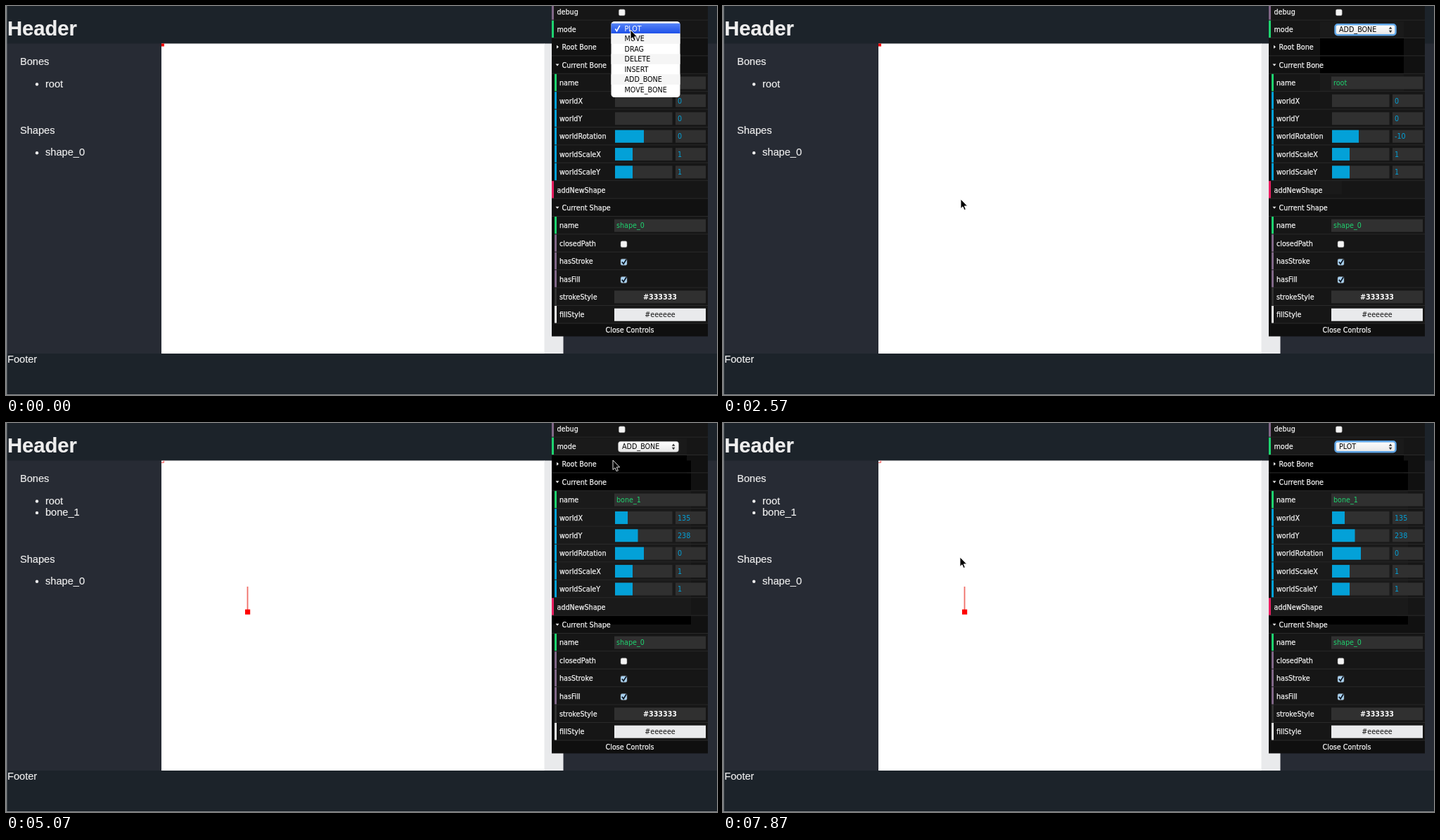
Animation of 1011 by 554 pixels, one loop 8000 ms. Source, as an HTML page:

```html
<!DOCTYPE html>
<html lang="en">
<head>
<meta charset="utf-8">
<title>Bone editor</title>
<style>
  html, body { margin: 0; width: 100%; height: 100%; overflow: hidden; background: #1c232a; }
  svg { display: block; }
  text { white-space: pre; font: 9.6px "DejaVu Sans", sans-serif; }
  .page { font: 14.6px "Liberation Sans", Arial, sans-serif; fill: #eee; stroke: #eee; stroke-width: .2px; }
  .page.big { font-size: 29.2px; font-weight: bold; }
  .label { fill: #f2f2f2; stroke: #f2f2f2; stroke-width: .25px; }
  .bold { font-weight: bold; }
  .mid { text-anchor: middle; }
</style>
</head>
<body>
<svg id="stage" width="1011" height="554" viewBox="0 0 1011 554">
  <defs>
    <linearGradient id="blue" x2="0" y2="1"><stop stop-color="#5684f7"/><stop offset="1" stop-color="#1c4fe8"/></linearGradient>
    <linearGradient id="button" x2="0" y2="1"><stop stop-color="#fff"/><stop offset="1" stop-color="#e6e6e6"/></linearGradient>
  </defs>
  <g id="scene"></g>
</svg>
<script>
const LOOP = 8000, PITCH = 25.4, ITEM = 14.53;
const GREEN = '#1ed36f', BLUE = '#03a1d8', PURPLE = '#806787', RED = '#e61d5f', FIELD = '#303030';
const MODES = ['PLOT', 'MOVE', 'DRAG', 'DELETE', 'INSERT', 'ADD_BONE', 'MOVE_BONE'];
const TITLES = [2, 3, 11];

// Pointer moves: first step, last step, number of steps, destination
const MOVES = [
  [320, 320, 1, 885, 37], [560, 930, 5, 880, 104], [1020, 1110, 2, 881, 105],
  [1300, 2040, 8, 339, 238], [2170, 2260, 2, 320, 262], [2350, 2570, 3, 338, 275],
  [2670, 2910, 3, 330, 268], [3450, 3620, 3, 340, 259], [3800, 4070, 4, 342, 267],
  [4290, 4290, 1, 339, 268], [4440, 4440, 1, 344, 265],
  [5070, 5070, 1, 863, 53], [5160, 5340, 3, 891, 35], [5430, 5870, 6, 890, 10],
  [5960, 6050, 2, 888, -30], [6850, 6940, 2, 866, 24], [7030, 7300, 4, 279, 268],
  [7400, 7580, 3, 338, 193], [7690, 7690, 1, 328, 183], [7780, 7870, 2, 337, 191]
];

const rect = (x, y, w, h, fill, more = '') =>
  `<rect x="${x}" y="${y}" width="${w}" height="${h}" fill="${fill}" ${more}/>`;
const path = (d, more) => `<path d="${d}" ${more}/>`;
const text = (x, y, s, cls = '', more = '') => `<text x="${x}" y="${y}" class="${cls}" ${more}>${s}</text>`;
const tinted = (x, y, s, fill) => text(x, y, s, '', `fill="${fill}"`);
const rowTop = i => -4.8 + PITCH * i;
const rowMid = i => 7.9 + PITCH * i;

function pointer(t) {
  let x = 888, y = 34;
  for (const [from, to, steps, tx, ty] of MOVES) {
    if (t < from) break;
    const gap = (to - from) / (steps - 1 || 1) || 1;
    const part = Math.min(steps, Math.floor((t - from) / gap + 1.01)) / steps;
    x += (tx - x) * part;
    y += (ty - y) * part;
  }
  return [x, y];
}

function page(bone) {
  const shift = bone ? 16.4 : 0;
  const item = (y, s) => `<circle cx="44" cy="${y - 4}" r="2.2" fill="#eee"/>` + text(56, y, s, 'page');
  let out = rect(0, 0, 1011, 554, '#1c232a') + rect(0, 53.5, 1011, 441.5, '#272b34')
    + rect(221, 53.5, 545, 441.5, '#fff') + rect(765.5, 53.5, 27, 441.5, '#e9eaec')
    + rect(0, 0, 1.4, 554, '#85888b') + rect(0, 553, 1011, 1, '#85888b')
    + text(2, 41.7, 'Header', 'page big') + text(2, 508, 'Footer', 'page')
    + text(20, 84.3, 'Bones', 'page') + item(115.5, 'root')
    + text(20, 182.3 + shift, 'Shapes', 'page') + item(213.3 + shift, 'shape_0');
  if (bone) {
    out += item(131.9, 'bone_1')
      + path('M221 56.5H224.5V53.5', 'fill="#fcc" stroke="#f66"')
      + rect(342.6, 233, 1.8, 34, '#ef6f68') + rect(340, 265.5, 7.2, 7.2, '#f00');
  } else out += rect(221, 53.5, 4, 4, '#f00');
  return out;
}

// Repaints the row backgrounds inside a box in deeper tones
function patch(x0, y0, x1, y1) {
  let out = '';
  for (let i = 0; i < 18; i++) {
    const top = Math.max(y0, rowTop(i)), end = Math.min(y1, rowTop(i + 1) - 1);
    if (end > top) out += rect(x0, top, x1 - x0, end - top, TITLES.includes(i) ? '#000' : '#1a1a1a');
  }
  return out;
}

function checkbox(x, y, on) {
  return rect(x - 4.5, y - 4.3, 9, 9, on ? '#a9d3f3' : '#f4f4f4', 'rx="2" stroke="#777" stroke-width=".5"')
    + (on ? path(`M${x - 2.6} ${y}l2.2 2.8l4 -6.4`, 'fill="none" stroke="#0a1420" stroke-width="1.7"') : '');
}

function select(mode, focus) {
  const ring = focus ? 'stroke="#5fa5e6" stroke-width="2.4"' : 'stroke="#999" stroke-width=".5"';
  return rect(870.5, 26.3, 86, 15, 'url(#button)', `rx="3.5" ${ring}`)
    + tinted(876, 37.2, mode, '#000')
    + path('M946.8 32.8h4.6l-2.3 -3.4zM946.8 34.8h4.6l-2.3 3.4z', 'fill="#333"');
}

function panel(t, bone, mode, focus) {
  let out = rect(776, 0, 222, 470.5, '#0f0f0f');
  for (let i = 0; i < 18; i++)
    out += rect(776, rowTop(i), 222, PITCH, TITLES.includes(i) ? '#111' : '#161616');
  if (t >= 1300) out += patch(849, 22, 968, 122) + patch(849, 249, 880, 268);
  if (t >= 3800) out += patch(776, 22, 968, 122) + patch(776, 249, 959, 284.5);
  if (bone) out += patch(776, 53.5, 974, 287);
  for (let i = 0; i < 18; i++) out += rect(776, rowTop(i + 1) - 1, 222, 1, '#2a2a2a');

  const label = (i, x, s, color) =>
    (color ? rect(x - (x < 785 ? 7.5 : 7), rowTop(i), 3, PITCH - 1, color) : '') + text(x, rowMid(i) + 3.7, s, 'label');
  const nested = (i, s, color) => rect(776, rowTop(i), 4, PITCH, '#0c0c0c') + label(i, 787, s, color);
  const title = (i, s, open) => label(i, 790.5, s)
    + path(`M${open ? 781.5 : 783} ${rowMid(i) - (open ? 1.5 : 3)}` + (open ? 'h5l-2.5 3z' : 'v5l3 -2.5z'), 'fill="#eee"');
  const box = (i, fill = FIELD) => rect(865, rowMid(i) - 9, 130, 18, fill);
  const name = (i, s) => nested(i, 'name', GREEN) + box(i) + tinted(868, rowMid(i) + 3.7, s, GREEN);
  const slider = (i, s, value, width) => nested(i, s, BLUE)
    + rect(866, rowMid(i) - 9, 81.5, 18, FIELD) + rect(866, rowMid(i) - 9, width, 18, BLUE)
    + rect(952, rowMid(i) - 9, 43, 18, FIELD) + tinted(955, rowMid(i) + 3.7, value, BLUE);
  const flag = (i, s, on) => nested(i, s, PURPLE) + checkbox(878.5, rowMid(i) + 1, on);
  const angle = bone || t < 90 ? 0 : -10;

  return out + label(0, 783.5, 'debug', PURPLE) + checkbox(875.8, 9, false)
    + label(1, 783.5, 'mode', GREEN) + select(mode, focus)
    + title(2, 'Root Bone', false) + title(3, 'Current Bone', true)
    + name(4, bone ? 'bone_1' : 'root')
    + slider(5, 'worldX', bone ? 135 : 0, bone ? 18 : 0)
    + slider(6, 'worldY', bone ? 238 : 0, bone ? 32.5 : 0)
    + slider(7, 'worldRotation', angle, 41 + angle * .3)
    + slider(8, 'worldScaleX', 1, 25) + slider(9, 'worldScaleY', 1, 25)
    + label(10, 783.5, 'addNewShape', RED) + title(11, 'Current Shape', true)
    + name(12, 'shape_0')
    + flag(13, 'closedPath', false) + flag(14, 'hasStroke', true) + flag(15, 'hasFill', true)
    + nested(16, 'strokeStyle', '#333') + box(16) + text(930, rowMid(16) + 3.7, '#333333', 'bold mid', 'fill="#fff"')
    + nested(17, 'fillStyle', '#eee') + box(17, '#e9eaec') + text(930, rowMid(17) + 3.7, '#eeeeee', 'mid', 'fill="#111"')
    + text(887, 465.2, 'Close Controls', 'label mid');
}

function menu(top, checked, cursorY) {
  const hot = Math.floor((cursorY - top) / ITEM);
  let out = rect(860.5, top - 2.7, 98, 108, '#fff', 'rx="4.5"');
  MODES.forEach((mode, i) => {
    const y = top + ITEM * i, ink = i === hot ? '#fff' : '#000';
    if (i === hot) out += rect(860.5, y, 98, ITEM, 'url(#blue)');
    else if (i % 2 && i < 6) out += rect(860.5, y, 98, ITEM, '#f5f5f5');
    out += tinted(879.5, y + 10.8, mode, ink);
    if (i === checked)
      out += path(`M866.3 ${y + 7.8}l2.2 3.2l4.3 -7.8`, `fill="none" stroke="${ink}" stroke-width="1.6"`);
  });
  return out;
}

function scene(t) {
  const bone = t >= 4150, [x, y] = pointer(t);
  const focus = t >= 1300 && t < 3800 || t >= 6850;
  const mode = t < 1300 || t >= 6850 ? 'PLOT' : 'ADD_BONE';
  let out = page(bone) + panel(t, bone, mode, focus);
  if (t < 1300) out += menu(24.7, 0, y);
  else if (t >= 5340 && t < 6850) out += menu(-48.2, 5, y);
  return out + path('M0 0V13.5L3 10.8L5.1 15.6L7.3 14.6L5.3 9.9H9.6Z',
    `transform="translate(${x} ${y})" fill="#000" stroke="#fff" stroke-width=".9"`);
}

const target = document.getElementById('scene');
let shown = '';
function draw(now) {
  const next = scene(now % LOOP);
  if (next !== shown) target.innerHTML = shown = next;
  requestAnimationFrame(draw);
}
draw(0);
</script>
</body>
</html>
```
